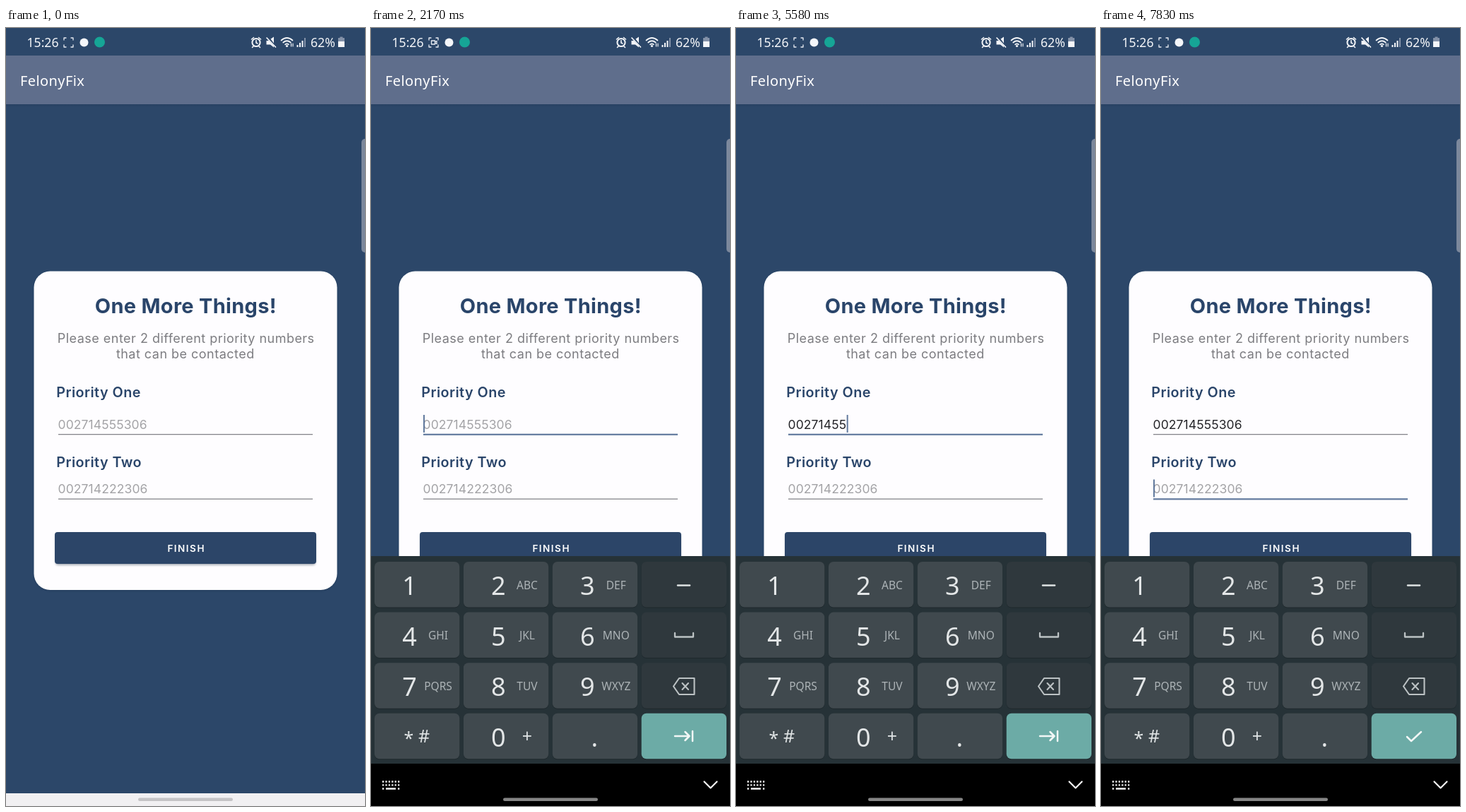
An HTML page that plays this animation: 508 px wide and 1102 px high, repeating every 8 s.

```html
<!DOCTYPE html>
<html lang="en">
<head>
<meta charset="utf-8">
<title>Priority numbers</title>
<style>
  html, body { margin: 0; width: 100%; height: 100%; overflow: hidden; background: #2c4769; }
  svg { display: block; }
  text { white-space: pre; }
  .sys { font-family: "Noto Sans", "Open Sans", sans-serif; }
  .app { font-family: Inter, "Open Sans", sans-serif; }
  .mid { text-anchor: middle; }
  .line { fill: none; stroke-linecap: round; stroke-linejoin: round; }
</style>
</head>
<body>
<svg id="stage" width="508" height="1102" viewBox="0 0 508 1102">
  <defs>
    <filter id="soft" x="-10%" y="-20%" width="120%" height="150%"><feGaussianBlur stdDeviation="1.5"/></filter>
    <linearGradient id="barShade" x2="0" y2="1">
      <stop stop-color="#1c3350" stop-opacity=".3"/><stop offset="1" stop-color="#1c3350" stop-opacity="0"/>
    </linearGradient>
  </defs>

  <rect width="508" height="1102" fill="#2c4769"/>
  <rect y="39" width="508" height="69" fill="#5f6e8c"/>
  <rect y="108" width="508" height="4" fill="url(#barShade)"/>
  <text class="sys" x="20" y="82" font-size="20" letter-spacing=".4" fill="#fff">FelonyFix</text>
  <rect x="503" y="157" width="14" height="161" rx="5" fill="#7c889c"/>

  <g class="sys" fill="#f4f6f9" font-size="17.6">
    <text x="29.5" y="27">15:26</text>
    <text x="431" y="27">62%</text>
  </g>
  <g class="line" stroke="#e9edf3" stroke-width="1.3" stroke-linecap="butt">
    <path d="M82 17v-3h3M92 14h3v3M95 24v3h-3M85 27h-3v-3"/>
    <path id="camera" d="M85.5 18h5v5h-5zM90.5 20l2.5-1.5v4l-2.5-1.5"/>
  </g>
  <circle cx="110.5" cy="20.5" r="6" fill="#f4f6f9"/>
  <circle cx="132.5" cy="20" r="7.5" fill="#16a596"/>
  <g class="line" stroke="#f4f6f9" stroke-width="2">
    <circle cx="354" cy="20.5" r="5.6"/>
    <path d="M354 17.5v3.5l2 1M347.5 16l3-2.5M360.5 16l-3-2.5M350 26l-1.5 1.5M358 26l1.5 1.5" stroke-width="1.6"/>
    <path d="M369 14l12.5 13" stroke-width="1.7"/>
  </g>
  <path d="M368.5 18h3.5l7 7.5v2l-5-4h-5.5zM374.5 15.5l4.5-3v9z" fill="#f4f6f9"/>
  <g class="line" stroke="#f4f6f9" stroke-width="1.7">
    <path d="M389.5 17.5q8-7 16 0M392.2 20.5q5.3-4.5 10.6 0M395 23.3q2.5-2 5 0"/>
    <path d="M403.5 26v-4M406 22v4" stroke-width="1.2"/>
  </g>
  <circle cx="397.5" cy="25.5" r="1.6" fill="#f4f6f9"/>
  <path d="M411.5 27v-3h2v3zM415 27v-6h2v6zM418.5 27v-9h2v9z" fill="#f4f6f9"/>
  <path d="M422 27v-13h2v13z" fill="#8391a8"/>
  <path d="M472.5 12.5h4v1.5h2.5v13h-9v-13h2.5z" fill="#8391a8"/>
  <path d="M470 19h9v8h-9z" fill="#f4f6f9"/>

  <rect x="40" y="346" width="428" height="451" rx="23" fill="#152b47" opacity=".4" filter="url(#soft)"/>
  <rect x="39.5" y="344.5" width="429" height="451.5" rx="23" fill="#fefdff"/>
  <g class="app">
    <text class="mid" x="254.3" y="404" font-size="29" font-weight="700" letter-spacing=".3" fill="#2a456a">One More Things!</text>
    <g class="mid" font-size="18" letter-spacing=".48" fill="#7c7c80">
      <text x="254.7" y="445.5">Please enter 2 different priority numbers</text>
      <text x="253.8" y="467.5">that can be contacted</text>
    </g>
    <g font-size="19.8" font-weight="600" letter-spacing=".45" fill="#2a456a">
      <text x="71.3" y="523">Priority One</text>
      <text x="71.3" y="622">Priority Two</text>
    </g>
    <g font-size="17.5" letter-spacing=".1">
      <text id="first" x="73.5" y="568"></text>
      <text id="second" x="73.5" y="659" fill="#a3a3a6">002714222306</text>
    </g>
  </g>
  <rect id="rule0" x="74" width="360"/>
  <rect id="rule1" x="74" width="360"/>
  <rect id="cursor" width="2" height="25" fill="#627a9e"/>
  <rect x="70" y="716" width="368" height="45" rx="4" fill="#17253b" opacity=".35" filter="url(#soft)"/>
  <rect x="69" y="714" width="370" height="45" rx="4" fill="#2c4568"/>
  <text class="app mid" x="255.2" y="741.7" font-size="13.5" font-weight="600" letter-spacing="1.5" fill="#fff">FINISH</text>

  <rect y="1084" width="508" height="18" fill="#f1f0f2"/>
  <g id="keyboard">
    <rect y="748" width="508" height="294.5" fill="#263237"/>
    <rect y="1042" width="508" height="420" fill="#000"/>
    <g id="keys"></g>
    <g class="line" stroke="#dfe3e4" stroke-width="2.5" stroke-linecap="butt">
      <path d="M434 789.5h17"/>
      <path d="M430 857v5.5h26v-5.500" stroke="#bcc2c4" stroke-width="2.3"/>
      <path d="M436 921h21.5v23H436l-8-11.5zM440.500 928l8.5 9M449 928l-8.5 9" stroke="#bcc2c4" stroke-width="2.1"/>
      <path id="next" d="M430 1003h20M444.5 997l6 6-6 6M455 996v14" stroke="#f2f7f6"/>
      <path id="done" d="M433 1004l6 6 14-13" stroke="#f2f7f6"/>
    </g>
  </g>
  <g id="nav">
    <path id="dots" stroke-width="2.3" stroke="currentColor"/>
    <path class="line" d="M471.5 1067.5l9 9 9-9" stroke="currentColor" stroke-width="2.2"/>
  </g>
  <rect id="pill" x="187" y="1090.5" width="134" height="4.5" rx="2.25"/>
</svg>
<script>
const LOOP = 8000, LEAD = 10, OPEN = 920, SLIDE = 324, NEXT = 7580, HOLD = 80;
const NUMBER = "002714555306";
const PRESSES = [2670, 2920, 3170, 3500, 4080, 4500, 5080, 5500, 5750, 6170, 6670, 7250];
const ROWS = [["1", "2 ABC", "3 DEF"], ["4 GHI", "5 JKL", "6 MNO"], ["7 PQRS", "8 TUV", "9 WXYZ"], ["*", "0 +", "."]];

const $ = id => document.getElementById(id);
const set = (el, attrs) => { for (const k in attrs) el.setAttribute(k, attrs[k]); };
const show = (id, on) => set($(id), { visibility: on ? "visible" : "hidden" });

function add(parent, tag, attrs, content = "") {
  const el = document.createElementNS("http://www.w3.org/2000/svg", tag);
  set(el, attrs);
  el.textContent = content;
  return parent.appendChild(el);
}

const keyFaces = {};

function label(content, x, y, size, fill, weight = 400) {
  add($("keys"), "text", { class: "sys mid", x, y, "font-size": size, fill, "font-weight": weight }, content);
}

function buildKeys() {
  for (let row = 0; row < 4; row++) for (let col = 0; col < 4; col++) {
    const x = 5 + col * 125.9, y = 756 + row * 71.6;
    const fill = col < 3 ? "#40494e" : row < 3 ? "#2f383d" : "#6caba6";
    const box = { x, width: 120.3, height: 64.5, rx: 7 };
    add($("keys"), "rect", { ...box, y: y + 1, fill: "#1f292d" });
    const face = add($("keys"), "rect", { ...box, y, fill });
    if (col === 3) continue;
    const [digit, letters] = ROWS[row][col].split(" ");
    if (digit === "*") {
      label("*", x + 48.5, y + 44, 25, "#dfe3e4");
      label("#", x + 70, y + 41, 25, "#dfe3e4");
      continue;
    }
    keyFaces[digit] = face;
    label(digit, x + (digit === "." ? 59.5 : 49.5), y + 47, 36, "#e3e6e7", 300);
    if (letters === "+") label("+", x + 90, y + 41, 25, "#dfe3e4");
    else if (letters) label(letters, x + 90, y + 38.5, 15.5, "#adb4b7");
  }
}

function drawRule(id, y, focused) {
  set($(id), focused
    ? { y: y - 0.3, height: 2.2, fill: "#627a9e" }
    : { y, height: 1.3, fill: "#85858b" });
}

function render(t) {
  const open = t >= OPEN, moved = t >= NEXT;
  const typed = PRESSES.filter(p => t >= p + HOLD);
  const count = typed.length;

  show("camera", (t + 920) % 1000 < 500);

  const first = $("first");
  first.textContent = count ? NUMBER.slice(0, count) : NUMBER;
  set(first, { fill: count ? "#242428" : "#a3a3a6" });
  drawRule("rule0", 575, open && !moved);
  drawRule("rule1", 666.5, moved);

  const blinkFrom = moved ? NEXT : count ? typed[count - 1] + HOLD : OPEN;
  show("cursor", open && (t - blinkFrom) % 1000 < 500);
  const advance = count && !moved ? first.getComputedTextLength() : 0;
  set($("cursor"), { x: 74 + advance, y: moved ? 639.5 : 548 });

  const left = 1 - Math.min(1, Math.max(0, (t - OPEN) / SLIDE));
  const settled = left === 0;
  show("keyboard", open);
  set($("keyboard"), { transform: `translate(0 ${354 * left ** 3})` });
  show("next", open && !moved);
  show("done", moved);

  show("nav", open);
  set($("nav"), { color: settled ? "#f4f4f4" : "#101a1f" });
  show("pill", !open || settled);
  set($("pill"), { fill: open ? "#858585" : "#c5c4c6" });

  const press = PRESSES.findIndex(p => t >= p && t < p + HOLD);
  for (const digit in keyFaces)
    set(keyFaces[digit], { fill: press >= 0 && NUMBER[press] === digit ? "#586264" : "#40494e" });
}

function frame() {
  render(performance.now() % LOOP + LEAD);
  requestAnimationFrame(frame);
}

buildKeys();
const dotRow = y => [0, 1, 2, 3, 4, 5].map(i => `M${16 + i * 4.4} ${y}h2.3`).join("");
set($("dots"), { d: dotRow(1067.5) + dotRow(1072.3) + "M16 1077.5h2.3M21 1077.5h14M38 1077.5h2.3" });
frame();
</script>
</body>
</html>
```
